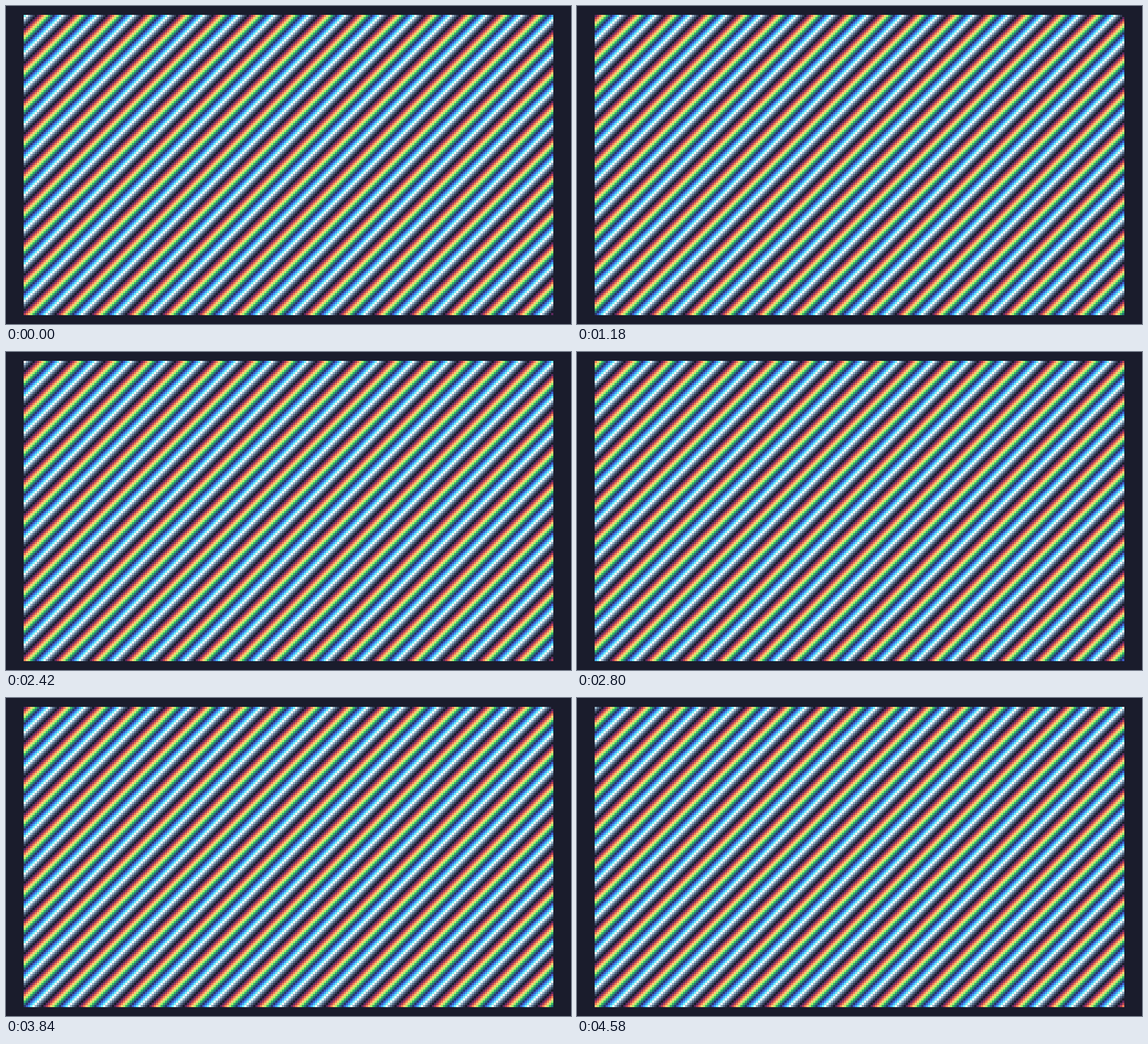
Write an HTML page with a canvas that moves like this. It is 768 by 432 pixels and loops after 4.6 s.

```html
<!DOCTYPE html>
<html lang="en">
<head>
<meta charset="utf-8">
<title>Rainbow stripes</title>
<style>
  html, body { margin: 0; width: 100%; height: 100%; overflow: hidden; background: #1a1c2c; }
  canvas { display: block; }
</style>
</head>
<body>
<canvas id="stage" width="768" height="432"></canvas>
<script>
const PALETTE = [
  '#1a1c2c', '#5d275d', '#b13e53', '#ef7d57', '#ffcd75', '#a7f070', '#38b764', '#257179',
  '#29366f', '#3b5dc9', '#41a6f6', '#73eff7', '#f4f4f4', '#94b0c2', '#566c86', '#333c57'
];
const COLS = 240, ROWS = 136, CELL = 3, LEFT = 24, TOP = 12;
const LOOP = 4600, STEP = 20;
const FIRST_SHIFT = 11;

const ctx = document.getElementById('stage').getContext('2d');

function draw(frame) {
  // The stripes advance at 60 ticks a second, shown at 50 frames a second.
  const shift = FIRST_SHIFT + Math.floor(frame * 6 / 5);
  ctx.fillStyle = PALETTE[0];
  ctx.fillRect(0, 0, 768, 432);
  for (let y = 0; y < ROWS; y++) {
    for (let x = 0; x < COLS; x++) {
      ctx.fillStyle = PALETTE[(x + y + shift) % PALETTE.length];
      ctx.fillRect(LEFT + x * CELL, TOP + y * CELL, CELL, CELL);
    }
  }
}

const start = performance.now();
let shown = -1;
function tick() {
  const frame = Math.floor(((performance.now() - start) % LOOP) / STEP);
  if (frame !== shown) draw(shown = frame);
  requestAnimationFrame(tick);
}
tick();
</script>
</body>
</html>
```
